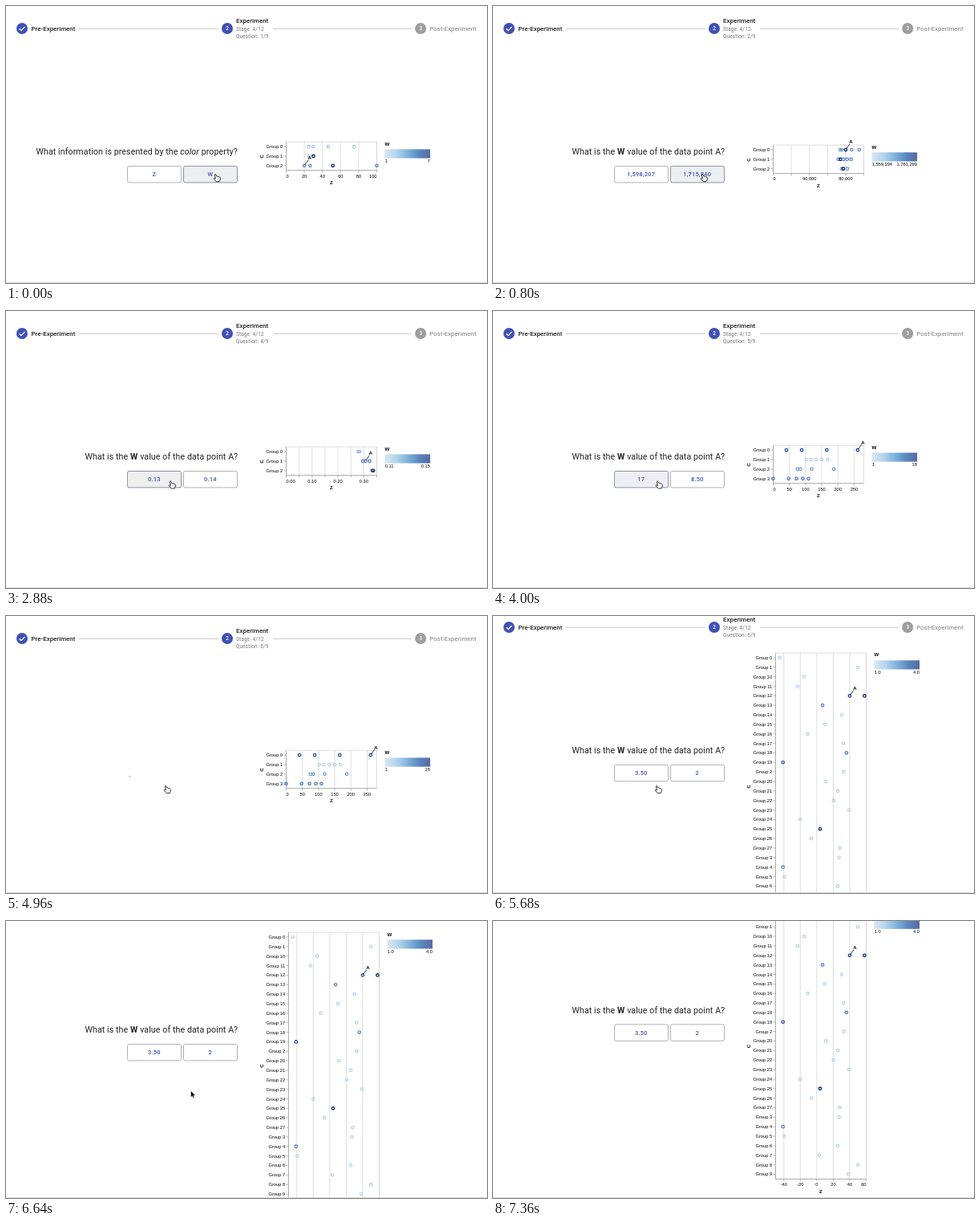
An HTML page that plays this animation: 600x345 px, repeating every 7440 ms.

```html
<!DOCTYPE html>
<html lang="en">
<head>
<meta charset="utf-8">
<title>Chart reading experiment</title>
<style>
  html, body { margin: 0; width: 100%; height: 100%; overflow: hidden; background: #fff; }
  svg { display: block; width: 600px; height: 345px; font-family: Roboto, sans-serif; }
  .chart { font-family: "Liberation Sans", Arial, sans-serif; font-size: 5.7px; fill: #000; }
  .chart .title { font-size: 6.1px; font-weight: 700; }
  .grid { stroke: #d6d6d6; stroke-width: .8; fill: none; }
  .axis { stroke: #999; stroke-width: .7; fill: none; }
  .dot { fill: none; stroke-width: 1.4; }
  .step { font-size: 7.94px; }
  .caption { font-size: 6.4px; letter-spacing: .025em; fill: #757575; }
  .num { font-size: 6.4px; font-weight: 500; fill: #fff; text-anchor: middle; }
  .ask { font-size: 10.67px; letter-spacing: .08px; text-anchor: end; fill: #212121; }
  .btn rect { fill: #fff; stroke: #999; stroke-width: .75; }
  .btn.on rect { fill: var(--tint); stroke: #6b7088; }
  .btn text { font-size: 7.5px; font-weight: 500; letter-spacing: .0286em; fill: #3f51b5; text-anchor: middle; }
  .off { display: none; }
</style>
</head>
<body>
<svg viewBox="0 0 600 345">
  <defs>
    <linearGradient id="blues">
      <stop offset="0" stop-color="#d9e7f4"/>
      <stop offset=".25" stop-color="#b4d5eb"/>
      <stop offset=".5" stop-color="#80b3da"/>
      <stop offset=".75" stop-color="#5a88c0"/>
      <stop offset="1" stop-color="#5769a3"/>
    </linearGradient>
  </defs>
  <g id="page">
    <path d="M91 28.4H265M333 28.4H506" stroke="#bdbdbd" stroke-width=".8"/>
    <circle cx="20" cy="28" r="7" fill="#3f51b5"/>
    <path d="M16.6 28.2l2.4 2.4 4.5-4.7" fill="none" stroke="#fff" stroke-width="1.3"/>
    <circle cx="276" cy="28" r="7" fill="#3f51b5"/>
    <circle cx="517.2" cy="28" r="7" fill="#9e9e9e"/>
    <text class="num" x="276" y="30.3">2</text>
    <text class="num" x="517.2" y="30.3">3</text>
    <text class="step" x="31.5" y="30.8" font-weight="500" fill="#212121">Pre-Experiment</text>
    <text class="step" x="287" y="21.4" font-weight="500" fill="#212121">Experiment</text>
    <text class="step" x="528.3" y="30.8" fill="#808080">Post-Experiment</text>
    <text class="caption" x="287" y="31.2">Stage: 4/12</text>
    <text class="caption" x="287" y="40.4" id="count"></text>
    <g id="charts"></g>
    <g id="form">
      <text class="ask" x="289" y="185.4" id="ask"></text>
      <g class="btn"><rect x="151.5" y="199.5" width="67" height="20.4" rx="2"/><text x="184.8" y="212.2"></text></g>
      <g class="btn"><rect x="221.5" y="199.5" width="67" height="20.4" rx="2"/><text x="254.8" y="212.2"></text></g>
    </g>
    <rect id="seed" x="153.2" y="199.4" width="2.4" height=".9" fill="#999"/>
  </g>
  <path d="M0 344.5H600" stroke="#dedede"/>
  <g id="cursor">
    <path id="hand" fill="#fff" stroke="#111" stroke-width=".85" stroke-linejoin="round"
      d="M-2.6-4.1Q-1.7-5-1-3.9L.1-1.6C.7-2.2 1.5-2 1.7-1.3 2.4-1.8 3.1-1.4 3.3-.7 3.9-.9 4.4-.4 4.4.3L4.2 2.4 3.2 4.5-.5 4.8-3.6 1.5C-4.2.7-3.3 0-2.7.4L-1.6 1.2Z"/>
    <path id="arrow" fill="#000" stroke="#fff" stroke-width=".5" transform="translate(-.5 -4.6)"
      d="M0 0V8.2L1.9 6.5 3.1 9.3 4.5 8.7 3.3 6H5.8Z"/>
  </g>
</svg>
<script>
const LOOP = 7440, TICK = 80, ROW = 11.852, WIDTH = 113;
const $ = id => document.getElementById(id);
const range = n => [...Array(n).keys()];
const clamp = v => Math.min(1, Math.max(0, v));
const mix = (a, b, p) => a + (b - a) * p;

// Pale to dark blue: red falls first, blue last
const shade = v => `rgb(${mix(200, 8, v ** .8)},${mix(218, 36, v)},${mix(236, 92, v ** 1.9)})`;

// A row of points between two data values, one of them optionally dark
const row = (from, to, count, tone, bend = 1, dark = -1) => range(count).map(i => ({
  x: mix(from, to, (i / Math.max(1, count - 1)) ** bend),
  tone: i === dark ? .95 : tone
}));

// Text centred vertically on y
const label = (x, y, s, anchor = 'start', cls = '') =>
  `<text x="${x}" y="${y + 2}" text-anchor="${anchor}" class="${cls}">${s}</text>`;

// mark: row and index of point A; every: how many ticks share one label
function drawChart({ left = 349.5, top, names, rows, min = 0, max, step, every = 1, format = String, legend, mark }) {
  const right = left + WIDTH, bottom = top + ROW * rows.length, legendX = left + 123;
  const px = v => left + (v - min) / (max - min) * WIDTH;
  const py = i => top + ROW * (i + .5);
  let out = `<rect class="grid" x="${left}" y="${top}" width="${WIDTH}" height="${bottom - top}"/>`;

  const first = Math.ceil(min / step), last = Math.floor(max / step + 1e-6);
  for (let i = first; i <= last; i++) {
    const v = i * step, x = px(v);
    const anchor = x - left < 1 ? 'start' : right - x < 1 ? 'end' : 'middle';
    out += `<path class="grid" d="M${x} ${top}V${bottom}"/><path class="axis" d="M${x} ${bottom}v2.7"/>`;
    if (i % every === 0) out += label(x, bottom + 6.8, format(v), anchor);
  }
  out += `<path class="axis" d="M${left} ${top}V${bottom}H${right}"/>`;

  rows.forEach((points, i) => {
    const y = py(i);
    out += `<path class="axis" d="M${left - 3} ${y}h3"/>`;
    out += label(left - 4.4, y, 'Group ' + (names ? names[i] : i), 'end');
    for (const p of points)
      out += `<circle class="dot" cx="${px(p.x)}" cy="${y}" r="1.7" stroke="${shade(p.tone)}"/>`;
  });

  const ax = px(rows[mark[0]][mark[1]].x), ay = py(mark[0]);
  out += `<path d="M${ax + .6} ${ay - 1}L${ax + 5} ${ay - 7}" stroke="#000" stroke-width=".8"/>`;
  out += label(ax + 6.5, ay - 9.6, 'A', 'middle', 'title');
  out += label((left + right) / 2 - .2, bottom + 15.6, 'Z', 'middle', 'title');
  out += `<text class="title" text-anchor="middle" transform="translate(321 ${(top + bottom) / 2 + .6}) rotate(-90)">C</text>`;
  out += label(legendX, top + 2.4, 'W', 'start', 'title');
  out += `<rect x="${legendX}" y="${top + 9.2}" width="56.6" height="11.2" fill="url(#blues)"/>`;
  out += label(legendX + .2, top + 24, legend[0]) + label(legendX + 56.4, top + 24, legend[1], 'end');
  return `<g class="chart off">${out}</g>`;
}

// The long chart: alphabetical groups, mostly pale scattered points
let seed = 7;
const random = () => (seed = seed * 16807 % 2147483647) / 2147483647;
const names = range(28).map(String).sort();
const standout = {
  12: row(40, 58, 2, .75, 1, 1), 13: row(7, 7, 1, .45), 18: row(36, 36, 1, .45),
  19: row(-41, -41, 1, .7), 25: row(4, 4, 1, .95), 4: row(-41, -41, 1, .45)
};
const scatter = names.map(n => standout[n] || row(mix(-45, 58, random()), 0, 1, .03));

const small = {
  top: 169.2, max: 100, step: 20, legend: ['1', '7'], mark: [2, 0],
  rows: [row(25, 75, 4, .08, 2.1), row(25, 30, 2, .05, 1, 1), row(20, 100, 4, .45, 2.3, 2)]
};
const large = {
  top: 173.1, max: 1e5, step: 2e4, every: 2, format: v => v.toLocaleString('en-US'),
  legend: ['1,559,394', '1,761,299'], mark: [0, 2],
  rows: [row(74e3, 95e3, 5, .35, 1.8, 2), row(72e3, 86e3, 5, .42, 1.3, 1), row(75500, 82e3, 3, .3, 1.8, 1)]
};
const fine = {
  top: 169.2, max: .35, step: .05, every: 2, format: v => v.toFixed(2), legend: ['0.11', '0.15'], mark: [1, 1],
  rows: [row(.278, .284, 2, .15), row(.296, .322, 3, .45, 1.4), row(.333, .337, 2, .8)]
};
const wide = {
  top: 167.3, max: 280, step: 50, legend: ['1', '18'], mark: [0, 3],
  rows: [row(41, 261, 4, .7, 1.4), row(102, 168, 5, .03, 1.1), row(75, 187, 4, .3, 2.3), row(0, 109, 5, .5, .6)]
};
const long = {
  left: 352.5, top: 60.1, names, rows: scatter, min: -50, max: 60, step: 20, legend: ['1.0', '4.0'], mark: [4, 0]
};
const charts = [small, large, fine, wide, long];
$('charts').innerHTML = charts.map(drawChart).join('');
const nodes = [...$('charts').children], buttons = [...document.querySelectorAll('.btn')];

const askColor = 'What information is presented by the <tspan font-style="italic">color</tspan> property?';
const askValue = 'What is the <tspan font-weight="700">W</tspan> value of the data point A?';

// The counter steps at `at`; the new question and chart follow after `wait`
const question = (at, chart, options, tint = '#eee', ask = askValue, wait = 160) =>
  ({ at, chart, options, tint, ask, wait });
const questions = [
  question(0, small, ['Z', 'W'], '#eceff1', askColor, 0),
  question(80, large, ['1,598,207', '1,715,840'], '#eceff1'),
  question(1440, small, ['4', '5']),
  question(2560, fine, ['0.13', '0.14'], '#eee', askValue, 0),
  question(3680, wide, ['17', '8.50'], '#eeeff6'),
  question(4880, long, ['3.50', '2'], '#eeeff6')
];

// Pointer moves: start, length, dx, dy
const moves = [[1120, 320, -56, 2.4], [4560, 320, -6, -.4], [5600, 480, 30, 0], [6880, 480, 239, -230]];
const pointer = t => moves.reduce(([x, y], [at, time, dx, dy]) => {
  const p = clamp((t - at) / time);
  return [x + dx * p, y + dy * p];
}, [263, 214]);

const scroll = t => t >= 6800 ? 70.6 : 46 * (1 - (1 - clamp((t - 5600) / 480)) ** 2);

const show = (node, on) => node.classList.toggle('off', !on);
let shown;

function fill(q) {
  if (q === shown) return;
  shown = q;
  $('ask').innerHTML = q.ask;
  nodes.forEach((node, i) => show(node, charts[i] === q.chart));
  buttons.forEach((b, i) => {
    b.lastChild.textContent = q.options[i];
    b.style.setProperty('--tint', q.tint);
  });
}

const start = performance.now();
function draw() {
  const t = Math.floor((performance.now() - start) % LOOP / TICK) * TICK;
  const n = questions.filter(q => q.at <= t).length, q = questions[n - 1];
  const age = t - q.at, ready = age >= q.wait;
  const [x, y] = pointer(t), offset = scroll(t);

  $('count').textContent = `Question: ${n}/9`;
  fill(ready ? q : questions[n - 2]);
  show($('form'), ready);
  show($('seed'), !ready && age >= TICK);
  buttons.forEach((b, i) => {
    const left = 151.5 + 70 * i, below = y + offset - 199.5;
    b.classList.toggle('on', x > left && x < left + 67 && below > 0 && below < 20.4);
  });
  $('page').setAttribute('transform', `translate(0 ${-offset})`);
  $('cursor').setAttribute('transform', `translate(${x} ${y})`);
  show($('hand'), t < 5760);
  show($('arrow'), t >= 5760);
  requestAnimationFrame(draw);
}
draw();
</script>
</body>
</html>
```
